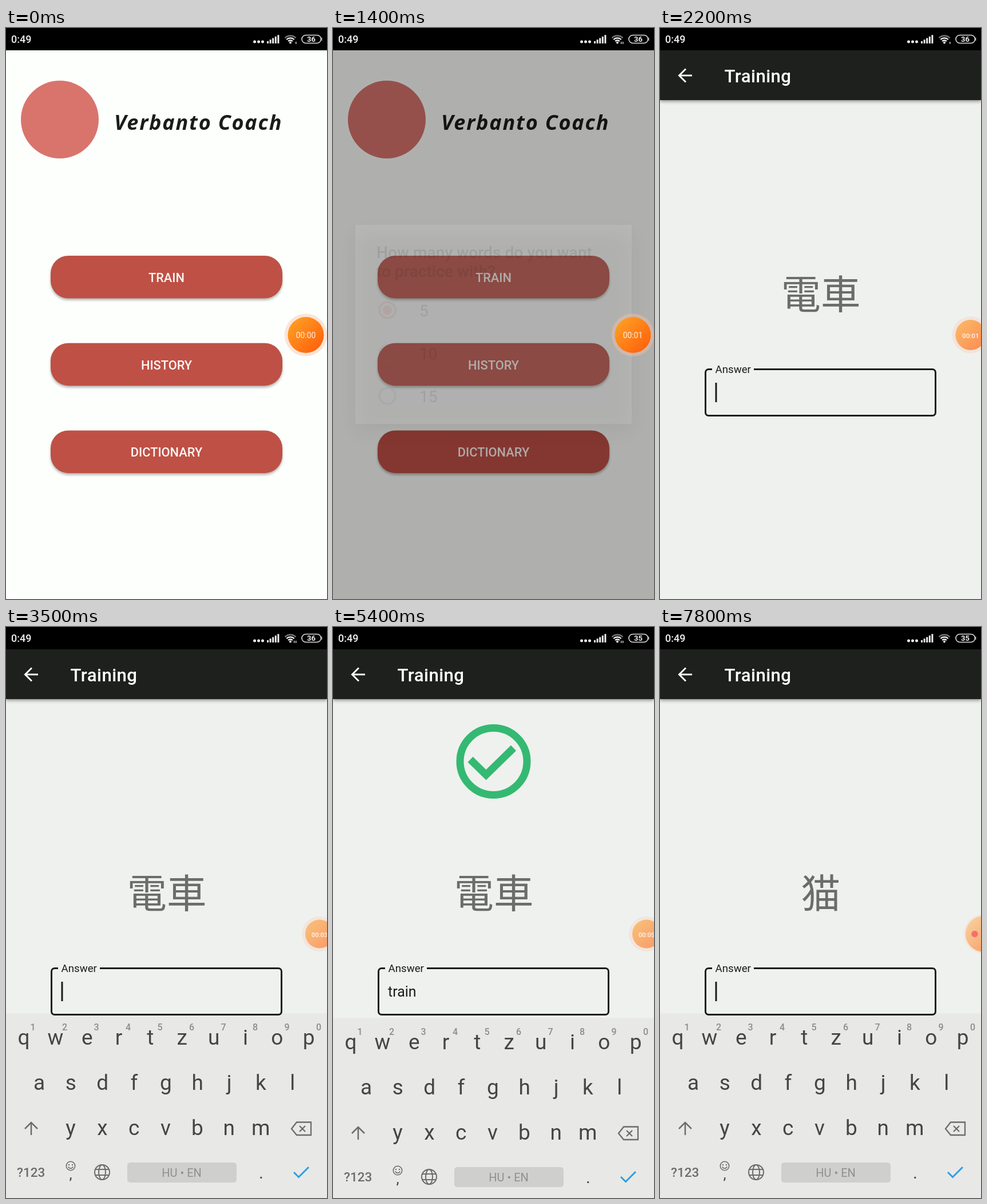
Animation, 561 px wide and 998 px high, one loop 8000 ms. Source, as an HTML page with a canvas:

```html
<!DOCTYPE html>
<html lang="ja">
<head>
<meta charset="utf-8">
<style>
html, body { margin: 0; width: 561px; height: 998px; overflow: hidden; background: #fdfffc; }
canvas { display: block; }
</style>
</head>
<body>
<canvas id="stage" width="561" height="998"></canvas>
<script>
const W = 561, H = 998, LOOP = 8000;
const RED = '#bf5045', INK = '#1a1c1a', GREY = '#6b6d6b';
const c = document.getElementById('stage').getContext('2d');

const span = (t, a, b) => Math.min(1, Math.max(0, (t - a) / (b - a)));
const ease = p => 1 - (1 - p) ** 3;
const mix = (a, b, p) => a + (b - a) * p;
const within = (t, ...ranges) => ranges.some(([a, b]) => t >= a && t < b);

function rect(x, y, w, h, color) {
  c.fillStyle = color;
  c.fillRect(x, y, w, h);
}
function box(x, y, w, h, r, color) {
  c.beginPath();
  c.roundRect(x, y, w, h, r);
  c.fillStyle = color;
  c.fill();
}
function disc(x, y, r, color) {
  c.beginPath();
  c.arc(x, y, r, 0, 7);
  c.fillStyle = color;
  c.fill();
}
function ring(x, y, r, width, color) {
  c.beginPath();
  c.arc(x, y, r, 0, 7);
  c.lineWidth = width;
  c.strokeStyle = color;
  c.stroke();
}
function line(points, width, color, closed) {
  c.beginPath();
  for (let i = 0; i < points.length; i += 2) c.lineTo(points[i], points[i + 1]);
  if (closed) c.closePath();
  c.lineWidth = width;
  c.strokeStyle = color;
  c.stroke();
}
function text(s, x, y, size, color, { weight = 400, align = 'left', family = 'Roboto', gap = 0 } = {}) {
  c.font = `${weight} ${size}px ${family}, sans-serif`;
  c.letterSpacing = gap + 'px';
  c.textAlign = align;
  c.fillStyle = color;
  c.fillText(s, x, y);
}
function shadow(blur, dy, alpha) {
  c.shadowBlur = blur;
  c.shadowOffsetY = dy;
  c.shadowColor = `rgba(0,0,0,${alpha})`;
}
function layer(draw) {
  c.save();
  draw();
  c.restore();
}

function statusBar(t) {
  rect(0, 0, W, 39, '#000');
  text('0:49', 9, 26, 18, '#eee', { weight: 500 });
  for (let i = 0; i < 3; i++) disc(434.5 + i * 7, 24, 2.5, '#eee');
  for (let i = 0; i < 5; i++) {
    const h = 4 + i * 2.7;
    rect(456 + i * 4.6, 27 - h, 3, h, '#eee');
  }
  for (const [r, color] of [[13.5, '#777'], [9.5, '#eee'], [5.5, '#eee']]) {
    c.beginPath();
    c.arc(497, 27, r, -2.35, -0.79);
    c.lineWidth = 2.4;
    c.strokeStyle = color;
    c.stroke();
  }
  disc(497, 25.5, 2, '#eee');
  const arrows = t >= 7600 ? 0 : within(t, [0, 400], [2100, 2900]) ? 1 : 2;
  for (let i = 0; i < arrows; i++) rect(506 - i * 3, 24, 1.5, 4, '#ccc');
  c.beginPath();
  c.roundRect(517, 12.5, 33.5, 14, 7);
  c.lineWidth = 1.6;
  c.strokeStyle = '#ddd';
  c.stroke();
  rect(551, 17, 1.5, 5, '#aaa');
  text(t < 4500 ? '36' : '35', 533.5, 24, 13, '#eee', { weight: 700, align: 'center' });
}

function menu(t) {
  rect(0, 39, W, H, '#fdfffc');
  disc(94, 160, 68, '#d9746c');
  text('Verbanto Coach', 189, 178, 36, INK, { weight: 'italic 700', family: '"Open Sans"', gap: 1.8 });
  ['TRAIN', 'HISTORY', 'DICTIONARY'].forEach((label, i) => {
    const y = 398 + i * 152.7;
    layer(() => {
      shadow(4, 3, 0.3);
      box(78, y, 405, 74.5, 31, RED);
    });
    if (!i && within(t, [100, 600])) layer(() => {
      c.beginPath();
      c.roundRect(78, y, 405, 74.5, 31);
      c.clip();
      disc(280, 435, mix(50, 240, span(t, 100, 400)), 'rgba(255,255,255,.2)');
    });
    text(label, 280.5, y + 46, 21.8, '#fbf6f4', { weight: 500, align: 'center' });
  });
}

function dialog(t) {
  const shown = t < 1000 ? span(t, 300, 600) : 1 - span(t, 1150, 1430);
  const dim = 0.53 * (t < 1000 ? span(t, 300, 650) : 1 - span(t, 1150, 1750));
  rect(0, 39, W, H, `rgba(0,0,0,${dim})`);
  if (!shown) return;
  layer(() => {
    c.globalAlpha = shown;
    if (t < 1000) {
      const s = mix(0.92, 1, ease(shown));
      c.translate(280.5, 518);
      c.scale(s, s);
      c.translate(-280.5, -518);
    }
    layer(() => {
      shadow(34, 14, 0.45);
      box(39, 344, 483, 348, 3, '#fdfffc');
    });
    text('How many words do you want', 76, 402, 28.2, INK, { weight: 500 });
    text('to practice with?', 76, 435, 28.2, INK, { weight: 500 });
    [5, 10, 15].forEach((n, i) => {
      const y = 493 + i * 75;
      ring(95, y, 14, 3.2, i ? '#727472' : RED);
      if (!i) disc(95, y, 8, RED);
      text(n, 151, y + 11, 28, INK);
    });
  });
}

function question(word, answer, cursor, tick) {
  if (tick) layer(() => {
    c.globalAlpha = tick;
    ring(280.5, 235, 58.5, 13, '#34b972');
    line([240, 231.5, 267.5, 258.5, 315.5, 211.5], 13, '#34b972');
  });
  text(word, 281, 490.5, 69.5, GREY, { align: 'center', family: '"Noto Sans CJK JP"' });
  c.beginPath();
  c.moveTo(164, 596.5);
  c.lineTo(476, 596.5);
  c.arcTo(481.5, 596.5, 481.5, 602, 5.5);
  c.arcTo(481.5, 677.5, 476, 677.5, 5.5);
  c.arcTo(79.5, 677.5, 79.5, 672, 5.5);
  c.arcTo(79.5, 596.5, 85, 596.5, 5.5);
  c.lineTo(91, 596.5);
  c.lineWidth = 3;
  c.strokeStyle = INK;
  c.stroke();
  text('Answer', 96.5, 603, 18.7, INK);
  text(answer, 96, 646, 25, INK);
  if (cursor) rect(96.5 + c.measureText(answer).width, 620, 3, 34, INK);
}

const rows = [['qwertzuiop', 31, 730], ['asdfghjkl', 58, 809], ['yxcvbnm', 113, 888]];
const KEY_GAP = 55.35;

function keyboard(dy) {
  layer(() => {
    c.translate(0, dy);
    rect(0, 675.5, W, H, '#e8e9e6');
    for (const [keys, x, y] of rows)
      [...keys].forEach((k, i) => text(k, x + i * KEY_GAP, y, 37, '#444644', { align: 'center' }));
    [...'1234567890'].forEach((d, i) =>
      text(d, 47 + i * 55.5, 705, 16, '#8b8d8b', { weight: 500, align: 'center' }));
    line([44, 888, 44, 867], 2.5, GREY);
    line([33, 877, 44, 866, 55, 877], 2.5, GREY);
    line([499, 877, 508, 865.5, 533, 865.5, 533, 888, 508, 888], 2.3, GREY, true);
    line([513, 872, 523, 882], 2.3, GREY);
    line([523, 872, 513, 882], 2.3, GREY);
    text('?123', 19, 961, 22.5, GREY, { weight: 500 });
    ring(113, 942, 7.7, 1.6, GREY);
    disc(110, 940, 1.2, GREY);
    disc(116, 940, 1.2, GREY);
    c.beginPath();
    c.arc(113, 942, 4.3, 0.3, 2.84);
    c.stroke();
    text(',', 113, 965, 26, '#444644', { align: 'center' });
    ring(168, 953, 13, 2, GREY);
    c.beginPath();
    c.ellipse(168, 953, 6, 13, 0, 0, 7);
    c.stroke();
    line([156, 948, 180, 948], 2, GREY);
    line([156, 958, 180, 958], 2, GREY);
    box(212, 936, 191, 35, 5, '#cfd0ce');
    text('HU • EN', 307, 960.5, 20, '#8f918f', { align: 'center' });
    text('.', 446, 964, 30, '#444644', { align: 'center' });
    line([503, 953, 511.5, 961.5, 529, 944], 3, '#2b9fe3');
  });
}

function keyPopup(k) {
  const [keys, x0, y] = rows.find(r => r[0].includes(k));
  const x = x0 + keys.indexOf(k) * KEY_GAP;
  layer(() => {
    shadow(4, 1, 0.25);
    box(x - 32, y - 146, 64, 171, 8, '#f8f9f7');
  });
  text(k, x, y - 88, 46, '#333533', { align: 'center' });
}

function training(t) {
  rect(0, 39, W, H, '#eff1ee');
  layer(() => {
    shadow(6, 2, 0.45);
    rect(0, 39, W, 87, '#1e201e');
  });
  line([33, 83, 56, 83], 2.9, '#fff');
  line([45, 71.5, 33.5, 83, 45, 94.5], 2.9, '#fff');
  text('Training', 112.5, 95, 31.2, '#fff', { weight: 500, gap: 0.4 });

  const lowered = 8 * (span(t, 5100, 5300) - span(t, 7500, 7700));
  const rise = ease(span(t, 2700, 3200));
  if (rise) keyboard(mix(323, 0, rise) + lowered);

  const word = 'train';
  const typed = t < 4100 ? 0 : Math.min(5, 1 + Math.floor((t - 4100) / 200));
  const slide = W * ease(span(t, 6650, 6900));
  if (slide < W) layer(() => {
    c.translate(-slide, 0);
    const cursor = within(t, [0, 2600], [3500, 5200], [5800, 6300]);
    question('電車', word.slice(0, typed), cursor, span(t, 5100, 5300));
  });
  if (slide) layer(() => {
    c.translate(W - slide, 0);
    question('猫', '', !within(t, [7200, 7600]), 0);
  });
  if (within(t, [3900, 4900])) keyPopup(word[Math.floor((t - 3900) / 200)]);
}

function bubble(t) {
  const p = ease(span(t, 2000, 2500)), tuck = span(t, 5700, 5900);
  const x = mix(mix(524, 548, p), 565, tuck), y = 536.5;
  const r = mix(mix(31.5, 25, p), 31, tuck);
  layer(() => {
    c.globalAlpha = mix(1, 0.55, p);
    disc(x, y, r + mix(5.8, 3, tuck), 'rgba(250,190,165,.42)');
    const g = c.createLinearGradient(x - r * 0.7, y - r * 0.7, x + r * 0.7, y + r * 0.7);
    g.addColorStop(0, tuck ? '#fdb75c' : '#ff9a22');
    g.addColorStop(1, '#ff650e');
    disc(x, y, r, g);
  });
  if (tuck) return disc(x - 15, y, 5.8, '#f5706c');
  const sec = Math.max(0, Math.floor((t - 260) / 980));
  text('00:0' + sec, x, y + 5, mix(13.8, 11, p), 'rgba(255,255,255,.88)',
    { align: 'center', weight: p ? 500 : 400 });
}

function draw(t) {
  const enter = ease(span(t, 1550, 2000));
  if (enter < 1) layer(() => {
    c.translate(-W * 0.25 * enter, 0);
    menu(t);
    c.translate(W * 0.25 * enter, 0);
    dialog(t);
  });
  if (enter) layer(() => {
    c.translate(W * (1 - enter), 0);
    training(t);
  });
  statusBar(t);
  bubble(t);
}

function frame() {
  draw(Math.floor(performance.now() % LOOP / 100) * 100);
  requestAnimationFrame(frame);
}
frame();
</script>
</body>
</html>
```
